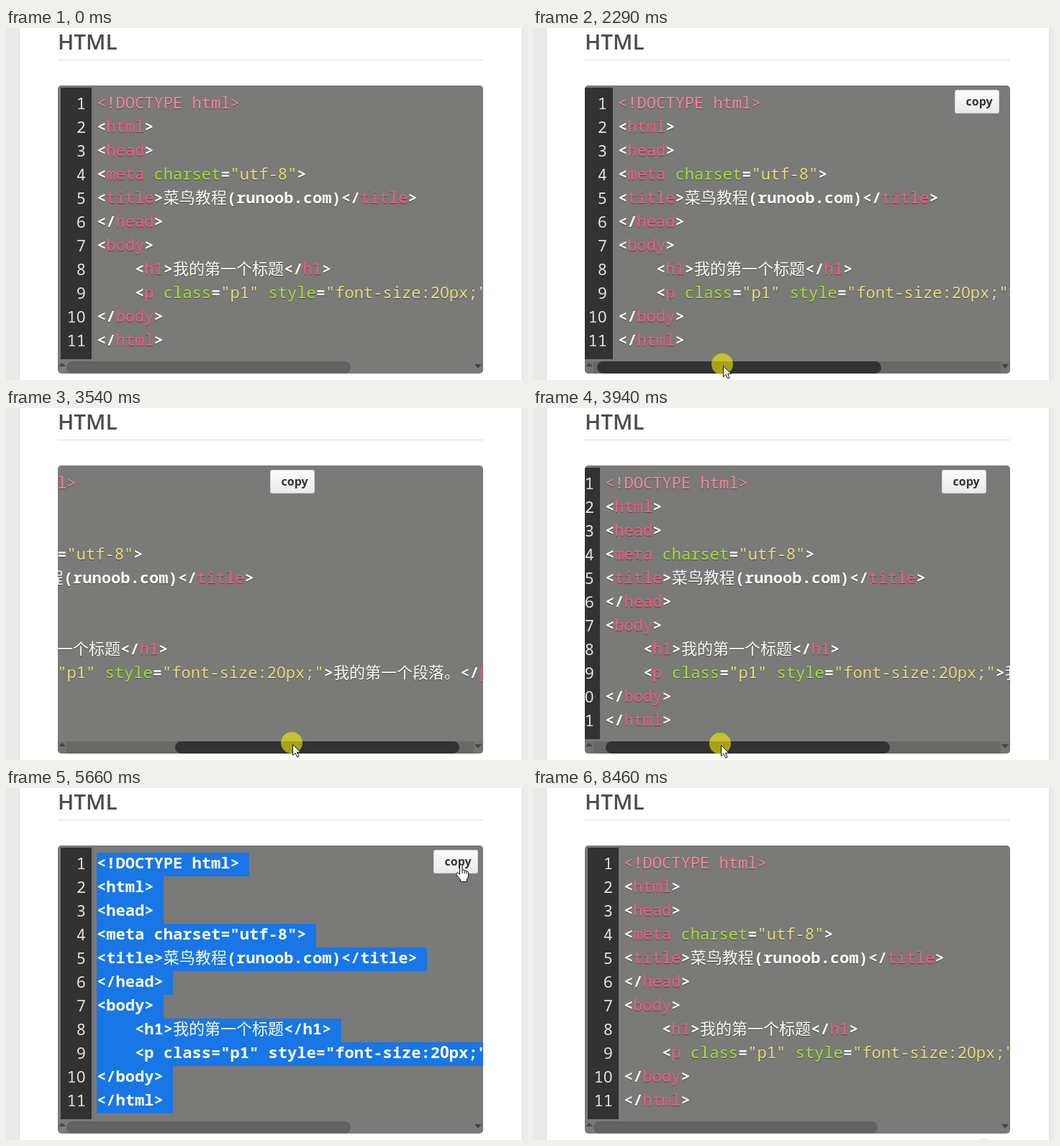
Recreate the animation shown at these times as an HTML page with a canvas. Size 724 px wide and 490 px high, loop 8610 ms.

```html
<!DOCTYPE html>
<html lang="zh">
<head>
<meta charset="utf-8">
<title>Code block demo</title>
<style>
html, body { margin: 0; width: 100%; height: 100%; overflow: hidden; background: #fff; }
canvas { display: block; }
</style>
</head>
<body>
<canvas id="stage" width="724" height="490"></canvas>
<script>
const ctx = document.getElementById('stage').getContext('2d');
const LOOP = 8610;
const MONO = '22.08px "Noto Sans Mono", "DejaVu Sans Mono", monospace';
const PLAIN = '22.5px "Noto Sans", "Open Sans", sans-serif';
const HAN = '300 22px "Noto Sans CJK SC", "Noto Sans CJK", "Noto Sans CJK JP", sans-serif';
const BLOCK = { x: 72, y: 80, w: 591, h: 401 };
const BUTTON = { x: 594, y: 86, w: 62, h: 33 };
const LINE_HEIGHT = 33, TEXT_X = 126, BASELINE = 112, ADVANCE = 13.25;
const MAX_SCROLL = 257, THUMB_RATIO = 0.665;
const WHITE = '#fbfbf8';

const LINES = [
  '<!DOCTYPE html>',
  '<html>',
  '<head>',
  '<meta charset="utf-8">',
  '<title>菜鸟教程(runoob.com)</title>',
  '</head>',
  '<body>',
  '    <h1>我的第一个标题</h1>',
  '    <p class="p1" style="font-size:20px;">我的第一个段落。</p>',
  '</body>',
  '</html>'
];

// Slow start for a > 1, slow end for b > 1.
const ease = (a, b) => u => 1 - (1 - u ** a) ** b;
const smooth = ease(2, 2);

// Each move starts where the previous one ended and advances in ticks.
const START = { x: 560, y: 500, scroll: 0 };
const MOVES = [
  { from: 820, until: 1680, ticks: 12, to: { x: 271, y: 464 }, via: { x: 440, y: 410 } },
  { from: 1750, until: 1910, ticks: 3, to: { x: 259, y: 470 } },
  { from: 2140, until: 2750, ticks: 9, to: { x: 418, y: 468, scroll: MAX_SCROLL }, curve: ease(3.8, 2) },
  { from: 3380, until: 4240, ticks: 12, to: { x: 243, y: 469, scroll: 0 }, curve: ease(2.8, 5.93) },
  { from: 4320, until: 5110, ticks: 11, to: { x: 645, y: 121 } },
  { from: 5190, until: 5490, ticks: 5, to: { x: 632, y: 107 } },
  { from: 6360, until: 6510, ticks: 3, to: { x: 596, y: 129 } },
  { from: 7290, until: 7920, ticks: 9, to: { x: 628, y: 505 }, via: { x: 680, y: 317 }, curve: ease(1, 2.08) }
];
const PRESSES = [[1910, 4320], [5490, 5660], [6740, 6920], [8460, LOOP]];
const SELECTED = [5660, 6920];
const BAR_HOVER = [1750, 4320];

const within = (t, [from, to]) => t >= from && t < to;
const inside = (p, r) => p.x >= r.x && p.x < r.x + r.w && p.y >= r.y && p.y < r.y + r.h;
const mix = (a, b, u) => a + (b - a) * u;

function pose(t) {
  let p = START;
  for (const { from, until, ticks, to, via, curve = smooth } of MOVES) {
    if (t < from) break;
    const tick = Math.floor((t - from) / (until - from) * (ticks - 1) + 0.1);
    const s = curve(Math.min(1, (tick + 1) / ticks));
    const end = { ...p, ...to };
    const bend = axis => {
      const mid = via ? via[axis] : (p[axis] + end[axis]) / 2;
      return Math.round(mix(mix(p[axis], mid, s), mix(mid, end[axis], s), s));
    };
    p = { x: bend('x'), y: bend('y'), scroll: Math.round(mix(p.scroll, end.scroll, s)) };
  }
  return p;
}

function rect(x, y, w, h, color) {
  ctx.fillStyle = color;
  ctx.fillRect(x, y, w, h);
}

function roundRect(x, y, w, h, r, fill) {
  ctx.beginPath();
  ctx.roundRect(x, y, w, h, r);
  ctx.fillStyle = fill;
  ctx.fill();
}

function shape(d, fill, stroke) {
  const path = new Path2D(d);
  ctx.fillStyle = fill;
  ctx.fill(path);
  if (!stroke) return;
  ctx.strokeStyle = stroke;
  ctx.lineWidth = 1;
  ctx.stroke(path);
}

// Draws text run by run in the fitting font and returns the end position.
function drawRuns(text, x, y, color) {
  ctx.fillStyle = color;
  for (const run of text.split(/([\u3000-\u9fff]+|0+)/)) {
    if (!run) continue;
    const latin = run[0] === '0' ? PLAIN : MONO;
    ctx.font = run[0] >= '\u3000' ? HAN : (color === WHITE ? '600 ' : '') + latin;
    ctx.fillText(run, x, y);
    x += ctx.measureText(run).width;
  }
  return x;
}

function tokenize(line) {
  const parts = line.split(/(<!.*>|"[^"]*"|(?<=<\/?)\w+|\w+(?=="))/);
  return parts.map((text, i) => {
    let color = WHITE;
    if (i % 2) {
      if (text.startsWith('<!')) color = '#fa859c';
      else if (text[0] === '"') color = '#e9df78';
      else if (parts[i + 1].startsWith('=')) color = '#a6e22e';
      else color = '#fb5b82';
    }
    return { text, color };
  });
}

const TOKENS = LINES.map(tokenize);

function lineWidth(line) {
  const han = (line.match(/[\u3000-\u9fff]/g) || []).length;
  return han * 22 + (line.length - han) * ADVANCE;
}

function drawPage() {
  rect(0, 0, 724, 490, '#eaeaea');
  rect(18, 0, 700, 490, '#dedede');
  rect(19, 0, 698, 490, '#fff');
  ctx.font = '600 29.7px "Open Sans", "Noto Sans", sans-serif';
  ctx.fillStyle = '#4f4b4b';
  ctx.fillText('HTML', 72, 30);
  rect(72, 44, 591, 1, '#ddd');
}

function drawCode(scroll, selected) {
  ctx.save();
  ctx.translate(-scroll, 0);
  rect(76, 83, 43, 378, '#323232');
  LINES.forEach((line, i) => {
    const y = BASELINE + i * LINE_HEIGHT;
    const number = String(i + 1);
    drawRuns(number, 111 - number.length * ADVANCE, y + 1, '#e2e2e2');
    if (selected) {
      rect(TEXT_X, y - 22, Math.round(lineWidth(line) + ADVANCE), LINE_HEIGHT, '#1876e6');
    }
    ctx.shadowColor = selected ? 'transparent' : 'rgba(0,0,0,.4)';
    ctx.shadowOffsetY = 1;
    let x = TEXT_X;
    for (const { text, color } of TOKENS[i]) {
      x = drawRuns(text, x, y, selected ? WHITE : color);
    }
    ctx.shadowColor = 'transparent';
  });
  ctx.restore();
}

function drawScrollbar(scroll, active) {
  if (active) {
    rect(72, 464, 591, 17, '#737372');
    rect(84, 464, 566, 17, '#686867');
  }
  roundRect(84 + Math.round(scroll * THUMB_RATIO), 464, 395, 17, 8.5, active ? '#323232' : '#626261');
  shape('M73 471l5-5 5 5zM651 468h10l-5 6z', '#454545');
}

function drawButton(scroll) {
  const { x, y, w, h } = BUTTON, left = x - scroll;
  const shade = ctx.createLinearGradient(0, y, 0, y + h);
  shade.addColorStop(0, '#fcfcfc');
  shade.addColorStop(1, '#e9e9e9');
  roundRect(left, y, w, h, 3, '#d2d2d2');
  roundRect(left + 1, y + 1, w - 2, h - 2, 2, shade);
  ctx.font = 'bold 16px "Open Sans", "Noto Sans", sans-serif';
  ctx.fillStyle = '#333';
  ctx.fillText('copy', left + 15.5, y + 22);
}

function drawArrow() {
  shape('M.5.5v15l3.5-3.3 2.6 5.8 2.4-1-2.5-5.8h4.8z', '#fff', '#111');
}

function drawHand() {
  ctx.translate(-7, -1);
  shape('M5.5 14V2.5Q5.5.5 7.2.5T9 2.5V8Q11.5 7 12.3 9Q14 8 15 10Q17.5 9.6 17.5 12V16Q17.5 19 15.5 21V24.5H6.5V21.5L1 15Q0 12 2.5 11.7Z', '#fff', '#111');
  shape('M9 8v5M12.3 9v4M15 10v3.5', 'transparent', '#111');
}

function drawPointer(p, pressed) {
  if (pressed) {
    ctx.beginPath();
    ctx.arc(p.x - 1, p.y - 2, 15, 0, Math.PI * 2);
    ctx.fillStyle = 'rgba(255,250,0,.57)';
    ctx.fill();
  }
  ctx.save();
  ctx.translate(p.x, p.y);
  if (inside(p, BUTTON)) drawHand();
  else drawArrow();
  ctx.restore();
}

function draw(t) {
  const p = pose(t);
  drawPage();
  ctx.save();
  ctx.beginPath();
  ctx.roundRect(BLOCK.x, BLOCK.y, BLOCK.w, BLOCK.h, 5);
  ctx.clip();
  rect(BLOCK.x, BLOCK.y, BLOCK.w, BLOCK.h, '#7a7a78');
  drawCode(p.scroll, within(t, SELECTED));
  drawScrollbar(p.scroll, within(t, BAR_HOVER));
  if (inside(p, BLOCK)) drawButton(p.scroll);
  ctx.restore();
  drawPointer(p, PRESSES.some(span => within(t, span)));
}

const start = performance.now();
function frame() {
  draw((performance.now() - start) % LOOP);
  requestAnimationFrame(frame);
}
frame();
</script>
</body>
</html>
```
